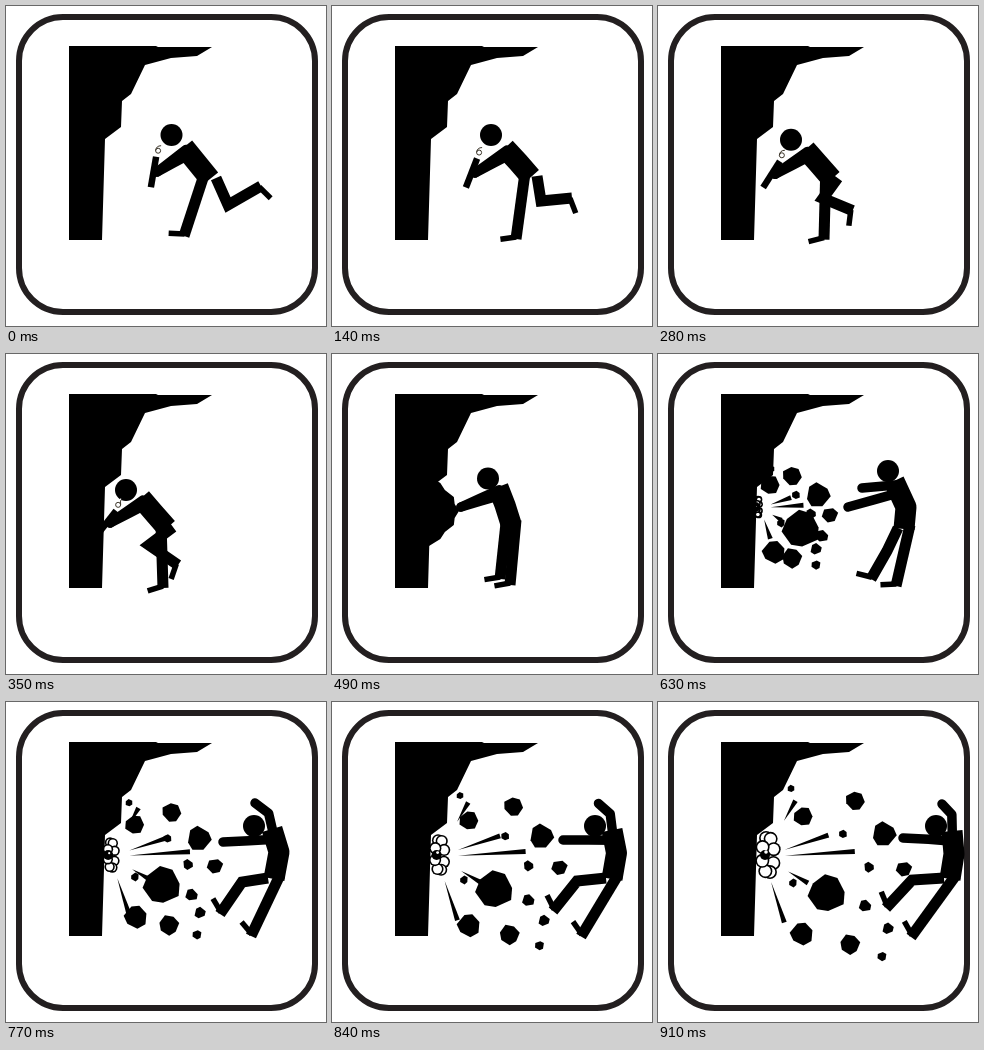
An HTML page with a canvas for the animation above (1410 ms loop, 320 by 320 pixels).

```html
<!DOCTYPE html>
<html>
<head>
<meta charset="utf-8">
<style>
html, body { margin: 0; width: 100%; height: 100%; overflow: hidden; background: #fff; }
canvas { display: block; width: 100vw; height: 100vh; }
</style>
</head>
<body>
<canvas id="stage" width="320" height="320"></canvas>
<script>
const ctx = document.getElementById('stage').getContext('2d');
const STEP = 70, LOOP = 1410, LAST = 13, BLAST = 9;
const BLAST_Y = 153;

// Key poses; limbs, feet and torso are built from these joints.
// Leg A is straight, leg B bends at the knee.
const POSES = [
  { at: 0, head: [165.5, 129], neck: [178, 141], spine: [191, 157], hip: [204, 173],
    handA: [151, 166], handB: [151, 166], footA: [178, 230], knee: [222, 199], footB: [255, 180] },
  { at: 2, head: [159, 129], neck: [173, 142], spine: [186, 156], hip: [199, 171],
    handA: [143, 167], handB: [143, 167], footA: [184, 233], knee: [209, 195], footB: [240, 192] },
  { at: 5, head: [120, 136], neck: [135, 144], spine: [147, 158], hip: [161, 174],
    handA: [104, 169], handB: [104, 169], footA: [157, 234], knee: [143, 191], footB: [172, 211] },
  { at: 7, head: [156, 124.5], neck: [166, 133], spine: [173, 151], hip: [179, 170],
    handA: [129, 153], handB: [129, 153], footA: [178, 231], knee: [171, 197], footB: [168, 225] },
  { at: 9, head: [230, 117], neck: [236, 127], spine: [248, 153], hip: [246, 175],
    handA: [204, 134], handB: [190, 153], footA: [238, 232], knee: [229, 197], footB: [213, 225] },
  { at: 11, head: [248, 124], neck: [266, 127], spine: [273, 150], hip: [268, 177],
    handA: [249, 101], handB: [217, 140], footA: [245, 234], knee: [236, 180], footB: [214, 212] },
  { at: 13, head: [278, 124], neck: [294, 129], spine: [296, 152], hip: [292, 177],
    handA: [284, 102], handB: [245, 136], footA: [253, 235], knee: [254, 178], footB: [228, 206] }
];

// size, x, y, sideways speed
const ROCKS = [
  [9, 112, 131, 33], [9, 134, 122, 63], [11.5, 160, 141, 66], [17.5, 143, 175, 26],
  [7.5, 172, 161, 74], [6, 164, 182, 43], [11, 116, 198, 28], [9.5, 134, 204, 58],
  [5.5, 158, 195, 72], [4.5, 158, 211, 66], [4, 138, 141, 47], [5, 153, 160, 58],
  [4, 123, 169, 12], [3.5, 113, 115, 20]
];

// angle in degrees, inner and outer radius
const RAYS = [[-60, 42, 65], [-18.5, 23, 69], [-3.5, 22, 92], [30, 29, 52], [72, 26, 69]];

const WALL = [[63, 40], [150, 40], [152, 41], [206, 41], [191, 50], [165, 52], [139, 59],
  [125, 88], [116, 95], [115, 121], [99, 133], [96, 234], [63, 234]];

const lerp = (a, b, u) => a + (b - a) * u;
const clamp = (v, lo, hi) => Math.max(lo, Math.min(hi, v));
const mix = (a, b, u) => [lerp(a[0], b[0], u), lerp(a[1], b[1], u)];
const polar = ([x, y], r, a) => [x + r * Math.cos(a), y + r * Math.sin(a)];

function path(pts) {
  ctx.beginPath();
  for (const [x, y] of pts) ctx.lineTo(x, y);
}
function fill(pts) {
  path(pts);
  ctx.fillStyle = '#000';
  ctx.fill();
}
function line(pts, width, cap = 'butt', join = 'miter') {
  path(pts);
  ctx.lineWidth = width;
  ctx.lineCap = cap;
  ctx.lineJoin = join;
  ctx.strokeStyle = '#000';
  ctx.stroke();
}
function disc([x, y], r, color = '#000') {
  ctx.beginPath();
  ctx.arc(x, y, r, 0, Math.PI * 2);
  ctx.fillStyle = color;
  ctx.fill();
}

function poseAt(k) {
  const i = Math.max(0, POSES.findIndex(p => p.at >= k) - 1);
  const from = POSES[i], to = POSES[i + 1];
  const u = (k - from.at) / (to.at - from.at);
  const pose = {};
  for (const joint in from) if (joint !== 'at') pose[joint] = mix(from[joint], to[joint], u);
  return pose;
}

function drawLeg(joints, flex) {
  const [a, b] = joints.slice(-2);
  const shin = Math.atan2(b[1] - a[1], b[0] - a[0]);
  line(joints, 11);
  line([polar(b, -2, shin), polar(polar(b, -2, shin), 16, shin + flex)], 5.5, 'butt', 'round');
}

// A raised arm bends backwards.
function drawArm(from, hand) {
  const bend = Math.max(0, from[1] - hand[1]) * 0.22;
  const mid = mix(from, hand, 0.5);
  line([from, [mid[0] + bend * 0.7, mid[1] - bend * 0.7], hand], 9.5, 'round', 'round');
}

function drawMan(p, k) {
  const flex = lerp(1.3, 2, clamp((k - BLAST) / 2, 0, 1));
  const gap = clamp((p.footA[0] - p.footB[0]) / 2, -6, 6);
  const [x, y] = p.hip;
  drawLeg([[x + gap, y - 4], p.footA], flex);
  drawLeg([[x - gap, y - 1], p.knee, p.footB], flex);
  line([p.neck, p.spine, p.hip], 21, 'butt', 'round');
  drawArm(mix(p.neck, p.spine, 0.15), p.handA);
  drawArm(mix(p.neck, p.spine, 0.45), p.handB);
  disc(p.head, 11);
}

function drawStick(hand, k) {
  const tilt = Math.PI / 2 + 0.17 + 0.1 * k;
  const mid = [hand[0] - 3.5, hand[1]];
  const top = polar(mid, -15.5, tilt);
  line([top, polar(mid, 15.5, tilt)], 6.5);

  const x = top[0] + 2, y = top[1] - 6, side = k % 2 ? -1 : 1;
  for (const [width, color] of [[3, '#fff'], [1, '#3a3428']]) {
    ctx.beginPath();
    ctx.arc(x, y, 2.5, 0, Math.PI * 2);
    ctx.moveTo(x - 2.5 * side, y);
    ctx.quadraticCurveTo(x - 2 * side, y - 5, x + 3, y - 5);
    ctx.lineWidth = width;
    ctx.strokeStyle = color;
    ctx.stroke();
  }
}

function drawBulge(grow) {
  const pts = [];
  for (let i = 0; i <= 10; i++) {
    pts.push([97 + grow * (27 * Math.sin(Math.PI * i / 10) + 3 * (i % 2)), 122 + 7 * i]);
  }
  fill(pts);
}

function drawRocks(t) {
  ROCKS.forEach(([size, x, y, speed], n) => {
    const pos = [x + speed * t, y + 0.75 * (y - BLAST_Y) * t];
    const sides = Math.round(5 + size / 6), pts = [];
    for (let i = 0; i < sides; i++) {
      const angle = (i + 0.12 * Math.sin(n + i * 3)) / sides * Math.PI * 2 + n;
      pts.push(polar(pos, size * (1.06 + 0.07 * Math.sin(n * 7 + i * 2.4)), angle));
    }
    fill(pts);
  });
}

function drawRays(t) {
  const grow = lerp(0.47, 1, 1 - (1 - t) ** 2);
  const origin = [lerp(100, 105, grow), BLAST_Y + 2 * grow];
  for (const [deg, inner, outer] of RAYS) {
    const angle = deg * Math.PI / 180, half = 2.5 / outer / grow;
    fill([polar(origin, inner * grow, angle),
      polar(origin, outer * grow, angle - half), polar(origin, outer * grow, angle + half)]);
  }
}

function drawSmoke(t) {
  const s = lerp(0.2, 1, t), x = lerp(98, 110, s), r = lerp(2.5, 7, s);
  for (let i = 0; i < 8; i++) {
    const a = i / 8 * Math.PI * 2 - 1.9;
    const puff = [x + 6 * s * Math.cos(a), BLAST_Y + lerp(6, 18, s) * Math.sin(a)];
    disc(puff, r);
    disc(puff, Math.max(0, r - 1.6), '#fff');
  }
  disc([x - 3, BLAST_Y], 5);
  disc([x - 2, BLAST_Y - 3 * s], 1.8 * s, '#fff');
}

function drawBorder() {
  ctx.beginPath();
  ctx.roundRect(13, 11, 296, 295, 44);
  ctx.lineWidth = 6;
  ctx.strokeStyle = '#231f20';
  ctx.stroke();
}

function draw(k) {
  const t = (k - BLAST) / (LAST - BLAST);
  const man = poseAt(k);
  ctx.fillStyle = '#fff';
  ctx.fillRect(0, 0, 320, 320);
  drawBorder();
  fill(WALL);
  if (k === 6 || k === 7) drawBulge((k - 5) / 2);
  if (k >= BLAST) {
    drawSmoke(t);
    drawRays(t);
  }
  if (k >= 8) drawRocks(t);
  drawMan(man, k);
  if (k <= 5) drawStick(man.handA, k);
}

function tick() {
  const t = performance.now() % LOOP;
  draw(Math.min(LAST, Math.floor(t / STEP)));
  requestAnimationFrame(tick);
}
tick();
</script>
</body>
</html>
```
